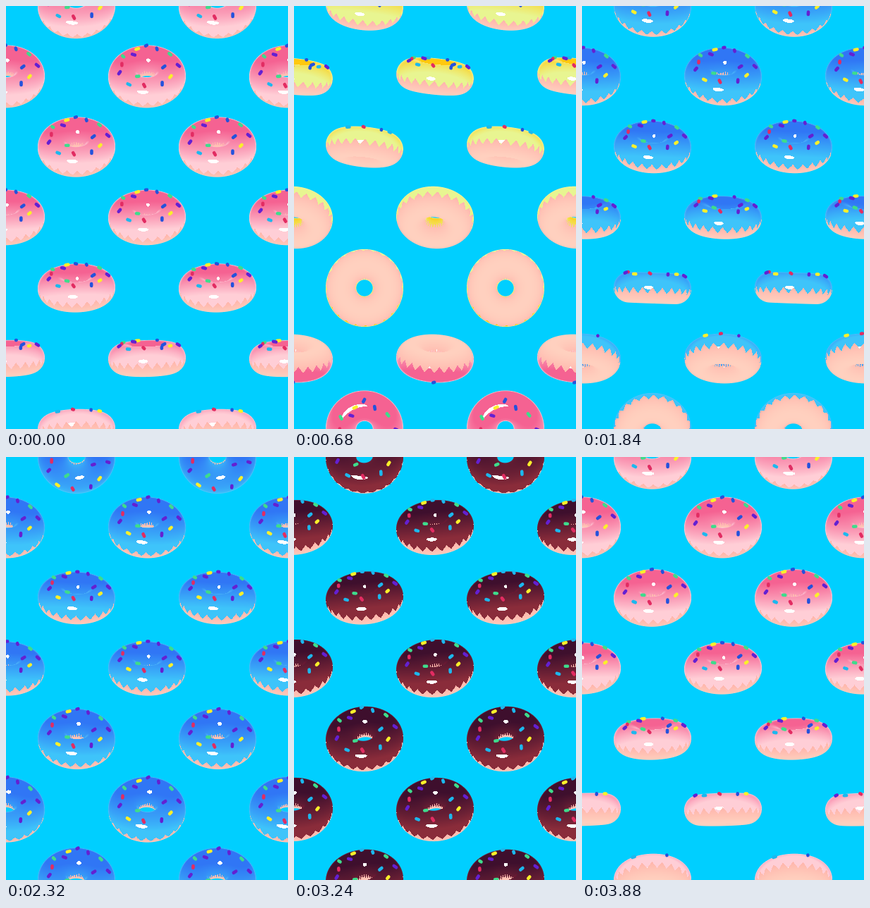
An HTML page with a canvas for the animation above (3920 ms loop, 400 by 600 pixels).

```html
<!DOCTYPE html>
<html lang="en">
<head>
<meta charset="utf-8">
<title>Donuts</title>
<style>
  html, body { margin: 0; width: 100%; height: 100%; overflow: hidden; background: #00cfff; }
  canvas { display: block; }
</style>
</head>
<body>
<canvas id="stage" width="400" height="600"></canvas>
<script>
const LOOP = 3920, STEP = 40, ROW_LAG = 65;
const RING = 33.4, TUBE = 21.1, SIZE = 120, HALF = SIZE / 2;
const RAD = Math.PI / 180;

const stage = document.getElementById('stage').getContext('2d');
const tile = document.createElement('canvas');
tile.width = tile.height = SIZE;
const pen = tile.getContext('2d', { willReadFrequently: true });
const image = pen.createImageData(SIZE, SIZE);

// start: moment the bare underside faces the viewer and the glaze changes
const flavours = [
  { start: -522, roll: -1.5, deep: [245, 98, 146], pale: [255, 206, 214], rim: [255, 214, 224], swap: {} },
  { start: 420, roll: 6, deep: [255, 200, 14], pale: [232, 245, 145], rim: [255, 246, 170], swap: { yellow: 'cyan' } },
  { start: 1415, roll: 2, deep: [48, 118, 245], pale: [62, 196, 250], rim: [86, 196, 250], swap: { blue: 'purple', cyan: 'yellow' } },
  { start: 2441, roll: -5, deep: [62, 15, 45], pale: [138, 44, 58], rim: [120, 24, 52], swap: { blue: 'cyan' } }
];

// pitch in degrees: 0 underside, 90 edge-on, 180 glaze to the viewer
const settle = [
  [-32, -30], [0, 0], [32, 26], [65, 48], [98, 65], [130, 78], [163, 89],
  [199, 98], [232, 106], [264, 113], [329, 122], [394, 129], [459, 133]
];
const flip = [
  [-430, 138], [-378, 129], [-313, 120], [-248, 118], [-183, 132], [-150, 163],
  [-130, 190], [-105, 232], [-65, 292], [-32, 330], [0, 360], [32, 386]
];

const inks = {
  purple: '#6420d2', blue: '#2452dc', cyan: '#1cb8ee',
  green: '#3edc8c', yellow: '#faf02a', red: '#e22c62'
};
// angle round the ring, angle round the tube, colour
const sprinkles = [
  [-126, 60, 'cyan'], [-96, 70, 'red'], [-60, 65, 'blue'], [-35, 70, 'yellow'],
  [-5, 115, 'blue'], [2, 58, 'purple'], [35, 70, 'green'], [66, 80, 'blue'],
  [90, 60, 'blue'], [110, 80, 'yellow'], [128, 100, 'purple'], [148, 75, 'green'],
  [175, 85, 'red'], [198, 70, 'purple'], [237, 115, 'green']
];

const clamp = v => Math.max(0, Math.min(1, v));
const smooth = v => { v = clamp(v); return v * v * (3 - 2 * v); };

function curve(keys, x) {
  let i = 1;
  while (i < keys.length - 3 && x >= keys[i + 1][0]) i++;
  const slope = j => (keys[j + 1][1] - keys[j - 1][1]) / (keys[j + 1][0] - keys[j - 1][0]);
  const [x0, y0] = keys[i], [x1, y1] = keys[i + 1];
  const w = x1 - x0, s = (x - x0) / w, s2 = s * s, s3 = s2 * s;
  return y0 * (2 * s3 - 3 * s2 + 1) + y1 * (3 * s2 - 2 * s3)
    + w * (slope(i) * (s3 - 2 * s2 + s) + slope(i + 1) * (s3 - s2));
}

function pose(time) {
  const first = flavours[0].start;
  const t = ((time - first) % LOOP + LOOP) % LOOP + first;
  let i = 3;
  while (t < flavours[i].start) i--;
  const now = flavours[i], next = flavours[(i + 1) % 4];
  const end = i < 3 ? next.start : first + LOOP;
  const gap = end - now.start, since = t - now.start;
  const keys = settle.concat(flip.map(([x, y]) => [x + gap, y]));
  const turn = smooth(1 - (gap - since) / 150);
  return {
    flavour: now,
    tilt: (180 - curve(keys, since)) * RAD,
    roll: (now.roll + (next.roll - now.roll) * turn) * RAD
  };
}

// Follows a ray into the torus: nearest distance and its depth
const hit = { d: 0, z: 0 };
function cast(x, y, c, s) {
  const limit = RING * Math.abs(s) + TUBE + 1;
  let z = limit;
  hit.d = 1e9;
  while (z > -limit) {
    const v = y * c - z * s, w = y * s + z * c;
    const q = Math.sqrt(x * x + v * v) - RING;
    const d = Math.sqrt(q * q + w * w) - TUBE;
    if (d < hit.d) { hit.d = d; hit.z = z; }
    if (d < 0.12) break;
    z -= Math.max(d, 0.3);
  }
}

function paint({ flavour, tilt, roll }) {
  const c = Math.cos(tilt), s = Math.sin(tilt);
  const cr = Math.cos(roll), sr = Math.sin(roll);
  const px = image.data;
  const { deep, pale, rim } = flavour;
  px.fill(0);
  for (let j = 0; j < SIZE; j++) {
    for (let i = 0; i < SIZE; i++) {
      const sx = i + 0.5 - HALF, sy = j + 0.5 - HALF;
      if (sx * sx + sy * sy > 3200) continue;
      const x = sx * cr + sy * sr, y = sx * sr - sy * cr;
      cast(x, y, c, s);
      if (hit.d >= 1) continue;
      const z = hit.z, v = y * c - z * s, w = y * s + z * c;
      const ring = Math.sqrt(x * x + v * v) || 1, q = ring - RING;
      const len = Math.sqrt(q * q + w * w);
      const nx = q / len * x / ring, nv = q / len * v / ring, nw = w / len;
      const ny = nv * c + nw * s, nz = nw * c - nv * s;
      const wave = Math.atan2(v, x) / (2 * Math.PI) * 24 + 24;
      const tooth = Math.abs(wave % 1 * 2 - 1) * 2 - 1;
      const glazed = w > -4 + 4.5 * tooth;
      const k = clamp(glazed ? 0.5 * nw + 0.013 * v + 0.4 : 0.15 - nw * 0.8);
      const edge = glazed ? 0.75 * clamp(1 - nz / 0.3) : 0;
      const shine = glazed && (nz - 0.1 * nx + 0.02 * ny) / 1.0052 > 0.9925;
      const o = (j * SIZE + i) * 4;
      for (let n = 0; n < 3; n++) {
        let col;
        if (shine) col = 255;
        else if (glazed) {
          col = pale[n] + (deep[n] - pale[n]) * k;
          col += (rim[n] - col) * edge;
        } else col = n === 0 ? 255 : n === 1 ? 176 + 34 * k : 168 + 24 * k;
        px[o + n] = col;
      }
      px[o + 3] = 255 * clamp(1 - hit.d + 0.12);
    }
  }
  pen.putImageData(image, 0, 0);

  pen.save();
  pen.translate(HALF, HALF);
  pen.rotate(roll);
  pen.lineCap = 'round';
  pen.lineWidth = 4.6;
  sprinkles.forEach(([ringDeg, tubeDeg, ink], n) => {
    const a = ringDeg * RAD, b = tubeDeg * RAD, ca = Math.cos(a), sa = Math.sin(a);
    const cb = Math.cos(b), sb = Math.sin(b);
    const reach = RING + (TUBE + 0.6) * cb;
    const x = reach * ca, v = reach * sa, w = (TUBE + 0.6) * sb;
    const y = v * c + w * s, z = w * c - v * s;
    const facing = sb * c - cb * sa * s;
    if (facing < -0.35) return;
    cast(x, y, c, s);
    if (hit.d < 0.5 && hit.z - z > 3) return;
    const along = Math.cos(n * 2.1) * 2, across = Math.sin(n * 2.1) * 2;
    const dx = -sa * along - sb * ca * across;
    const dv = ca * along - sb * sa * across, dw = cb * across;
    const dy = dv * c + dw * s;
    pen.strokeStyle = inks[flavour.swap[ink] || ink];
    pen.beginPath();
    pen.moveTo(x - dx, -(y - dy));
    pen.lineTo(x + dx, -(y + dy));
    pen.stroke();
  });
  pen.restore();
}

function draw(time) {
  stage.fillStyle = '#00cfff';
  stage.fillRect(0, 0, 400, 600);
  for (let row = 0; row < 7; row++) {
    paint(pose(time - row * ROW_LAG));
    for (let x = row % 2 ? 0 : 100; x <= 400; x += 200) {
      stage.drawImage(tile, x - HALF, row * 100 - HALF);
    }
  }
}

let shown = -1;
function tick() {
  const time = Math.floor(performance.now() % LOOP / STEP) * STEP;
  if (time !== shown) draw(shown = time);
  requestAnimationFrame(tick);
}
tick();
</script>
</body>
</html>
```
